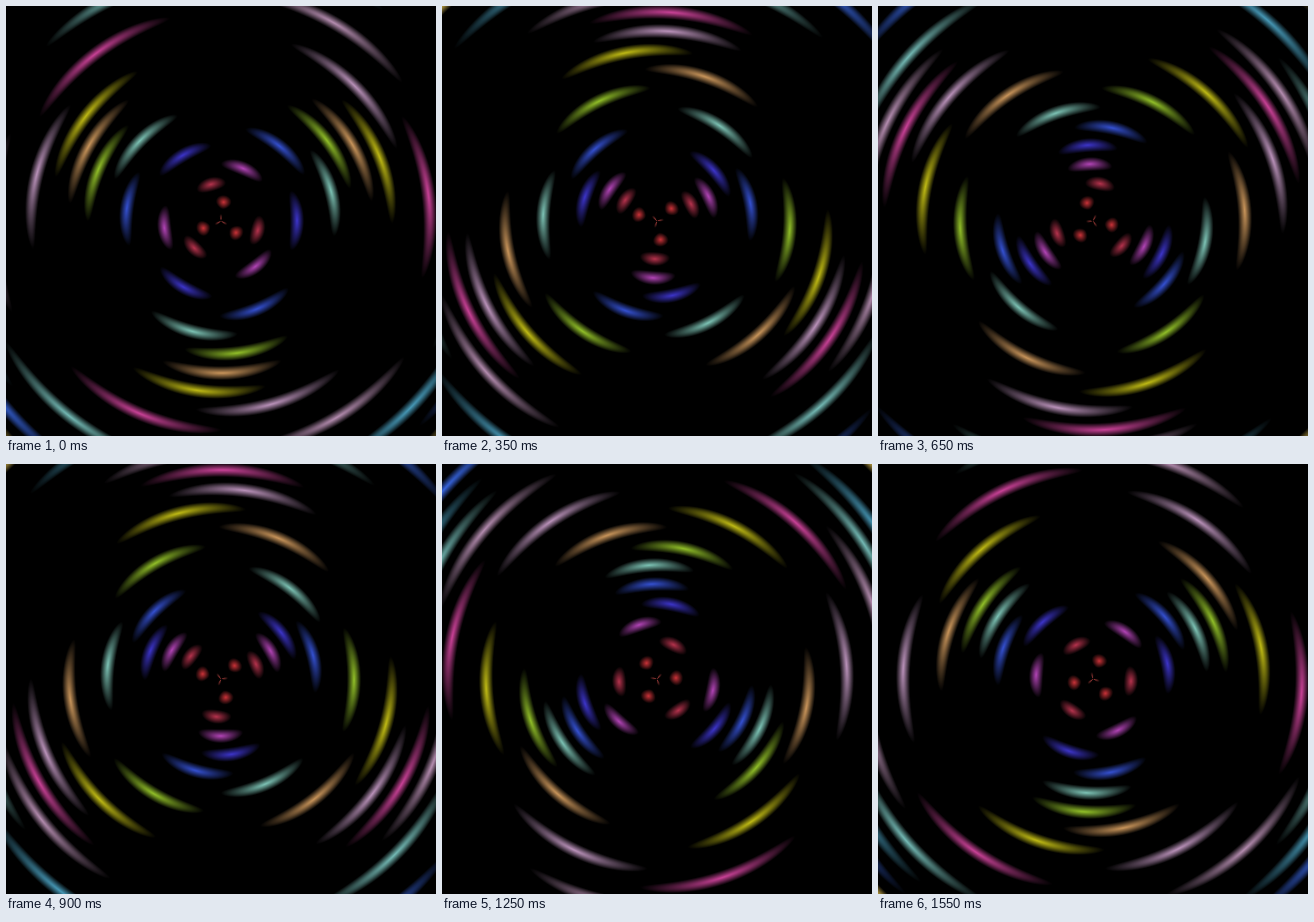
An HTML page with a canvas for the animation above (1.6 s loop, 512 px wide and 512 px high).

```html
<!DOCTYPE html>
<html lang="en">
<head>
<meta charset="utf-8">
<title>Counter-rotating rings</title>
<style>
  html, body { margin: 0; width: 100%; height: 100%; overflow: hidden; background: #000; }
  canvas { display: block; }
</style>
</head>
<body>
<canvas id="stage" width="512" height="512"></canvas>
<script>
const SIZE = 512, STEPS = 32, STEP_MS = 50;
const PITCH = SIZE * Math.SQRT1_2 / 16;
const RAD = Math.PI / 180;

// Half sizes of one lens: across the ring (in pitches) and along it
const HALF_WIDTH = 0.375, HALF_ARC = 23 * RAD;

// Peak colour of each ring, from the centre outwards
const COLORS = [
  '#c84a46', '#c83238', '#b4324c', '#b043b4', '#3c34c8', '#3450d0',
  '#7cc2b4', '#90be28', '#c8945a', '#beb914', '#b991b9', '#c84196',
  '#b48caf', '#73b9b4', '#4698b6', '#3764dc', '#c8aa46'
].map(hex => [1, 3, 5].map(i => parseInt(hex.slice(i, i + 2), 16)));

const ctx = document.getElementById('stage').getContext('2d');
const image = ctx.createImageData(SIZE, SIZE);
const count = SIZE * SIZE;
const ringOf = new Uint8Array(count);
const across = new Float32Array(count);
const cos3 = new Float32Array(count);
const sin3 = new Float32Array(count);

for (let p = 0; p < count; p++) {
  const x = p % SIZE - 255.5, y = Math.floor(p / SIZE) - 255.5;
  const r = Math.hypot(x, y) / PITCH, angle = 3 * Math.atan2(y, x);
  ringOf[p] = Math.round(r);
  across[p] = Math.abs(r - ringOf[p]) / HALF_WIDTH;
  cos3[p] = Math.cos(angle);
  sin3[p] = Math.sin(angle);
  image.data[4 * p + 3] = 255;
}

function draw(step) {
  // Neighbouring rings turn in opposite directions, one turn per loop
  const phases = COLORS.map((_, ring) => {
    const side = ring % 2 ? 1 : -1;
    const angle = 3 * RAD * (30 + side * (7.5 * ring + 0.4 - 360 * step / STEPS));
    return [Math.cos(angle), Math.sin(angle)];
  });
  const edge = Math.cos(3 * HALF_ARC);
  for (let p = 0; p < count; p++) {
    const ring = ringOf[p], phase = phases[ring], color = COLORS[ring];
    const wave = cos3[p] * phase[0] + sin3[p] * phase[1];
    let light = 0;
    if (across[p] < 1 && wave > edge) {
      const along = Math.acos(Math.min(1, wave)) / 3 / HALF_ARC;
      light = Math.max(0, 1 - Math.hypot(across[p], along));
    }
    for (let k = 0; k < 3; k++) image.data[4 * p + k] = color[k] * light;
  }
  ctx.putImageData(image, 0, 0);
}

const start = performance.now();
let shown = -1;
function tick() {
  const step = Math.floor((performance.now() - start) / STEP_MS) % STEPS;
  if (step !== shown) draw(shown = step);
  requestAnimationFrame(tick);
}
tick();
</script>
</body>
</html>
```
